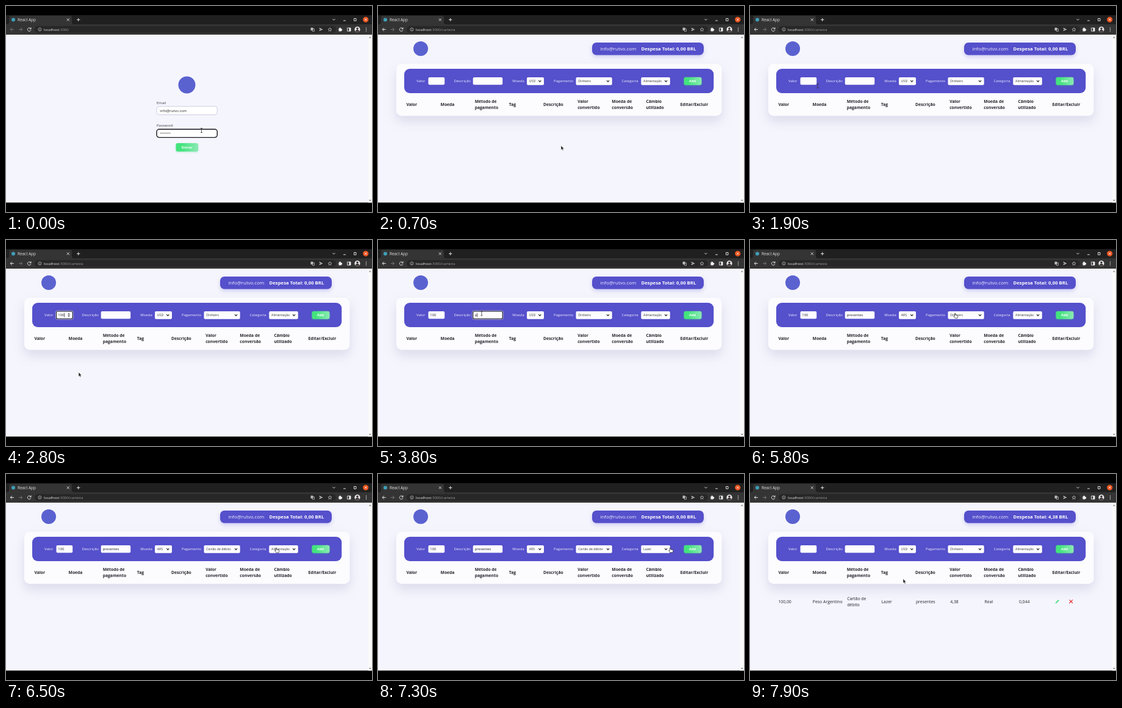
Write an HTML page that moves like this. It is 600x338 px and loops after 8 s.

```html
<!DOCTYPE html>
<html lang="pt">
<head>
<meta charset="utf-8">
<title>Carteira</title>
<style>
html, body { margin: 0; width: 100%; height: 100%; overflow: hidden; background: #000; }
svg { display: block; width: 100vw; height: 100vh; }
text { font-family: "Open Sans", "Noto Sans", sans-serif; white-space: pre; }
.b { font-weight: 700; }
.line { fill: none; stroke: #ddd; stroke-width: 1; }
.big { filter: drop-shadow(0 9px 9px rgba(90, 90, 140, .16)); }
.small { filter: drop-shadow(0 3px 3px rgba(85, 80, 203, .25)); }
.btn { filter: drop-shadow(0 1px 1.5px rgba(60, 200, 130, .35)); }
</style>
</head>
<body>
<svg id="stage" viewBox="0 0 600 338">
  <defs>
    <linearGradient id="green"><stop offset=".25" stop-color="#44e37e"/><stop offset="1" stop-color="#8ceab4"/></linearGradient>
  </defs>
  <g id="browser"></g>
  <g id="login"></g>
  <g id="wallet"></g>
  <g id="pointer">
    <path id="arrow" d="M0 0V7.2L1.7 5.7 2.8 8.2 4 7.6 2.9 5.2H5Z" fill="#222" stroke="#fff" stroke-width=".5"/>
    <path id="beam" d="M-1.6 -3.5H1.6M0 -3.5V3.5M-1.6 3.5H1.6" fill="none" stroke="#333" stroke-width=".8"/>
    <path id="hand" d="M-.8 0Q0 -.9 .7 0V2.5L4.2 3.3Q5 3.6 4.8 5L4 7.6H.2L-2.4 4.6Q-2.2 3.6 -.8 4.6Z" fill="#fff" stroke="#222" stroke-width=".7"/>
  </g>
</svg>
<script>
const $ = id => document.getElementById(id);
const EMAIL = 'info@rutvo.com', PURPLE = '#5550cb', INK = '#25252d';
const LOOP = 8000, STEP = 100;
const ENTER = 500, ADDED = 7600;

let layer;
function add(tag, attrs, content) {
  const el = document.createElementNS('http://www.w3.org/2000/svg', tag);
  for (const key in attrs) el.setAttribute(key, attrs[key]);
  if (content !== undefined) el.textContent = content;
  layer.append(el);
  return el;
}
const rect = (x, y, width, height, fill, rx = 0, more) => add('rect', { x, y, width, height, fill, rx, ...more });
const circle = (cx, cy, r, fill) => add('circle', { cx, cy, r, fill });
const line = (d, more) => add('path', { d, class: 'line', ...more });
const shape = (d, fill) => add('path', { d, fill });
const text = (x, y, size, fill, str, bold) =>
  add('text', { x, y, 'font-size': size, fill, class: bold ? 'b' : '' }, str);
const show = (el, on) => el.style.display = on ? '' : 'none';

function button(x, y, w, h, label, tx) {
  rect(x, y, w, h, 'url(#green)', 3, { class: 'btn' });
  text(tx, y + h / 2 + 2.1, 5.7, '#f4fff8', label, true);
}

function focusRing(x, y, w, h) {
  const g = add('g', {}), parent = layer;
  layer = g;
  rect(x - .8, y - .8, w + 1.6, h + 1.6, 'none', 2.5, { stroke: '#fff', 'stroke-width': .8 });
  rect(x, y, w, h, 'none', 2, { stroke: '#15151c', 'stroke-width': 1.1 });
  layer = parent;
  return g;
}

function select(x, w) {
  rect(x, 117, w, 12.8, '#fdfdff', 2);
  const cx = x + w - 6.7;
  line(`M${cx - 2} 122.2L${cx} 124.3 ${cx + 2} 122.2`, { style: 'stroke:#222;stroke-width:1.2' });
  return text(x + 3.8, 125.2, 5.2, '#333', '');
}

// Browser window
layer = $('browser');
rect(0, 15, 600, 16, '#202020');
shape('M2 30Q5 30 5 26V19Q5 16 8 16H105Q108 16 108 19V26Q108 30 111 30Z', '#343434');
rect(0, 30, 600, 17, '#343434');
rect(47, 33, 494, 11, '#272727', 5.5);
circle(12, 22.5, 3, '#3f9fb8');
text(19, 24.8, 6.4, '#e4e4e4', 'React App');
line('M99.8 20.5L103.8 24.5M103.8 20.5L99.8 24.5M116 22.5H121.4M118.7 19.8V25.2');
line('M535.5 21.3L537.5 23.3 539.5 21.3M553 24H557M570.5 20.5H574V24.3H570.5Z');
circle(589.7, 22.3, 4.6, '#e95420');
line('M588 20.6L591.4 24M591.4 20.6L588 24', { style: 'stroke:#fff;stroke-width:.9' });
const back = line('M12.8 38.5H7.2M9.8 35.8L7.1 38.5 9.8 41.2');
line('M21 38.5H26.6M24 35.8L26.7 38.5 24 41.2', { style: 'stroke:#777' });
line('M40.6 37.3A2.8 2.8 0 1 0 40.8 39.3M41 35.2V37.6H38.6');
line('M58 38.5A2.6 2.6 0 1 0 52.8 38.5A2.6 2.6 0 1 0 58 38.5M55.4 38V40M55.4 36.6V37.2', { style: 'stroke:#bbb;stroke-width:.8' });
const url = text(62, 40.6, 6.05, '#9a9a9a', '');
layer = url;
add('tspan', { fill: '#eee' }, 'localhost');
const path = add('tspan', {}, ':3000');
layer = $('browser');
rect(499.5, 35.5, 4, 4.5, '#bbb', .5);
line('M502 37.5H505.5V41.5H502Z', { style: 'stroke:#bbb;stroke-width:.8' });
shape('M513.5 35.5L519.5 38.4 513.5 41.3 514 39 517 38.4 514 37.8Z', '#bbb');
line('M531 35.6L531.9 37.6 534 37.8 532.4 39.2 532.9 41.3 531 40.2 529.1 41.3 529.6 39.2 528 37.8 530.1 37.6Z', { style: 'stroke:#ccc;stroke-width:.7' });
rect(545.4, 36.8, 4.6, 4.6, '#eee', .6);
circle(547.6, 36.6, 1.2, '#eee');
circle(550.2, 39, 1.2, '#eee');
line('M559.6 36H565V41.2H559.6Z');
rect(562.4, 36, 2.6, 5.2, '#eee');
circle(576, 38.4, 4.6, '#e8e8e8');
circle(576, 37, 1.8, '#3a3030');
shape('M572.8 41.6Q573 39 576 39T579.2 41.6Q576 44 572.8 41.6Z', '#3a3030');
for (const y of [36, 38.5, 41]) circle(590.5, y, .75, '#e4e4e4');
rect(0, 47, 600, 275.5, '#f5f5fd');
rect(593.5, 47, 6.5, 275.5, '#fafafa');
shape('M595 52.5L596.8 50.3 598.6 52.5Z', '#777');
shape('M595 318L596.8 320.2 598.6 318Z', '#777');

// Login page
layer = $('login');
circle(296.5, 129.5, 14, '#5a62d0');
text(247, 161, 6, '#3c3c46', 'Email');
rect(247, 164.7, 99.3, 13.8, '#fff', 4, { stroke: '#c8cae0', 'stroke-width': .9 });
text(252.3, 173.5, 5.9, INK, EMAIL);
text(247, 198.4, 5.95, '#3c3c46', 'Password');
rect(247, 202.2, 99.3, 13.4, '#fff', 4, { stroke: '#16161c', 'stroke-width': 1.4 });
text(252.3, 211, 5.9, INK, '•'.repeat(8));
button(278.5, 225, 36.5, 13.8, 'Entrar', 287.7);

// Wallet page
layer = $('wallet');
circle(70, 70, 12, '#5a62d0');
rect(351, 60, 183, 20.6, PURPLE, 7, { class: 'small' });
text(364.5, 73.1, 7.9, '#f1f1ff', EMAIL);
const total = text(431.5, 73.1, 7.75, '#fff', '', true);
rect(30, 94.7, 533.5, 85.5, '#fcfcff', 9, { class: 'big' });
rect(43, 103, 507.3, 40, PURPLE, 9);
[[63, 'Valor'], [124.5, 'Descrição'], [220.2, 'Moeda'], [288, 'Pagamento'], [399.5, 'Categoria']]
  .forEach(([x, label]) => text(x, 125.2, 6.05, '#eeeeff', label));
rect(82.5, 117, 26.7, 12.3, '#fdfdff', 2);
rect(155.7, 117, 48.5, 12.3, '#fdfdff', 2);
const valueRing = focusRing(82.5, 117, 26.7, 12.3);
const spinner = shape('M101.2 122.2L103 119.8 104.8 122.2ZM101.2 123.8L103 126.2 104.8 123.8Z', '#444');
const noteRing = focusRing(155.7, 117, 48.5, 12.3);
const value = text(85.3, 125.2, 5.85, INK, '');
const note = text(158.5, 125.2, 5.85, INK, '');
const caret = rect(0, 119.7, .7, 7, '#222');
const currency = select(244, 28), payment = select(324.5, 59.2), category = select(431.3, 47.5);
button(501.5, 116.7, 29, 13, 'Add', 510);

const column = i => 46.4 + 56.15 * i;
const cell = (x, mid, size, str, bold) => {
  const rows = str.split('|');
  rows.forEach((s, i) => text(x, mid + (i - (rows.length - 1) / 2) * 10.7, size, INK, s, bold));
};
['Valor', 'Moeda', 'Método de|pagamento', 'Tag', 'Descrição', 'Valor|convertido', 'Moeda de|conversão', 'Câmbio|utilizado', 'Editar/Excluir']
  .forEach((s, i) => cell(column(i), 164, 6.75, s, true));

const row = layer = add('g', {});
['100,00', 'Peso Argentino', 'Cartão de|débito', 'Lazer', 'presentes', '4,38', 'Real', '0,044']
  .forEach((s, i) => cell(column(i) + .22 * i, 212, 6.9, s));
line('M501.8 211.3L506.2 206.9', { style: 'stroke:#43dc7d;stroke-width:1.9' });
shape('M500.6 212.5L501 210.4 502.7 212.1Z', '#43dc7d');
line('M523.4 206.4L529 212M529 206.4L523.4 212', { style: 'stroke:#e62c2c;stroke-width:1.1' });

// Pointer route: time, x, y, look on arrival
const route = [
  [0, 320.5, 204, 'beam'], [100, 320.5, 204, 'beam'], [300, 297, 230, 'hand'], [500, 297, 230, 'hand'],
  [600, 300, 229, 'arrow'], [1400, 300, 229, 'arrow'], [2000, 96, 123, 'beam'], [2200, 96, 123, 'beam'],
  [2700, 119, 217, 'arrow'], [2900, 119, 217, 'arrow'], [3200, 172, 124, 'beam'], [3700, 172, 124, 'beam'],
  [4200, 151.8, 90.5, 'arrow'], [4900, 151.8, 90.5, 'arrow'], [5200, 258, 121, 'hand'], [5500, 258, 121, 'hand'],
  [5800, 336, 120.5, 'hand'], [6200, 336, 120.5, 'hand'], [6500, 443, 121.5, 'hand'], [7200, 443, 121.5, 'hand'],
  [7400, 515, 121, 'hand'], [7600, 515, 121, 'hand'], [7900, 251, 172, 'arrow']
];
const ease = u => u * u * (3 - 2 * u);

function movePointer(t) {
  const next = route.findIndex(k => k[0] > t);
  const b = route[next < 0 ? route.length - 1 : next];
  const a = next < 0 ? b : route[next - 1];
  const u = a === b ? 1 : ease((t - a[0]) / (b[0] - a[0]));
  const x = a[1] + (b[1] - a[1]) * u, y = a[2] + (b[2] - a[2]) * u;
  $('pointer').setAttribute('transform', `translate(${x} ${y})`);
  const near = a[3] === b[3] || u < .12 ? a[3] : u > .88 ? b[3] : 'arrow';
  for (const look of ['arrow', 'beam', 'hand']) show($(look), look === near);
}

const typed = (str, t, start, gap) => str.slice(0, Math.max(0, Math.floor((t - start) / gap) + 1));

function draw(t) {
  const inside = t >= ENTER, open = t < ADDED;
  show($('login'), !inside);
  show($('wallet'), inside);
  back.style.stroke = inside ? '#e4e4e4' : '#777';
  path.textContent = inside ? ':3000/carteira' : ':3000';

  value.textContent = open ? typed('100', t, 2400, 100) : '';
  note.textContent = open ? typed('presentes', t, 3800, 150) : '';
  currency.textContent = open && t >= 5400 ? 'ARS' : 'USD';
  payment.textContent = open && t >= 6200 ? 'Cartão de débito' : 'Dinheiro';
  category.textContent = open && t >= 7000 ? 'Lazer' : 'Alimentação';
  total.textContent = `Despesa Total: ${open ? '0,00' : '4,38'} BRL`;
  show(row, !open);

  const onValue = t >= 2100 && t < 3300, onNote = t >= 3300 && t < 5300;
  show(valueRing, onValue);
  show(spinner, onValue);
  show(noteRing, onNote);
  show(caret, onValue || onNote);
  const field = onNote ? note : value;
  caret.setAttribute('x', +field.getAttribute('x') + (field.textContent ? field.getComputedTextLength() : 0) + .2);
  movePointer(t);
}

function tick() {
  draw(Math.floor(performance.now() % LOOP / STEP) * STEP);
  requestAnimationFrame(tick);
}
tick();
</script>
</body>
</html>
```
